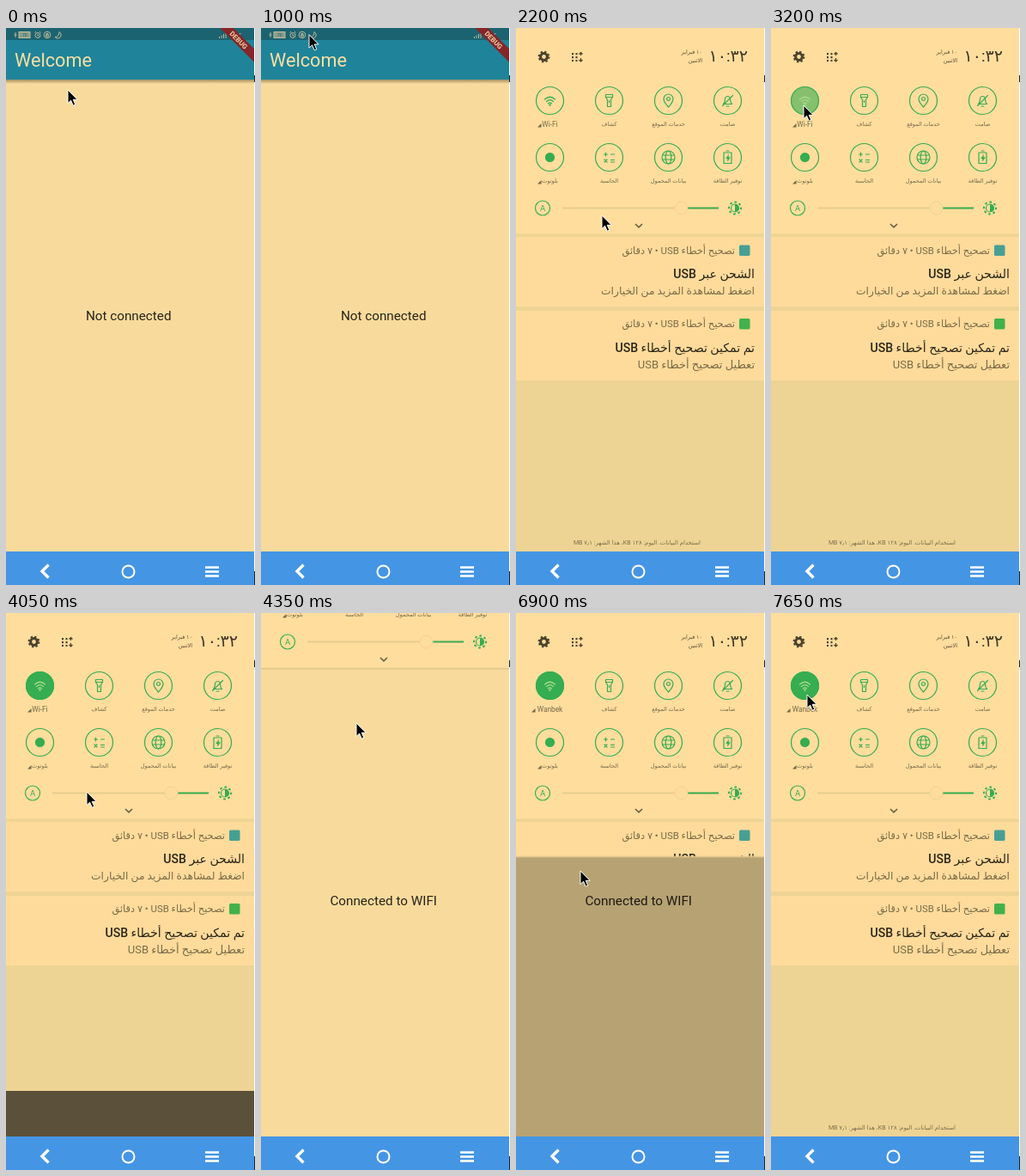
These frames come from a looping animation (290 by 648 pixels, 8000 ms). An HTML page:

```html
<!DOCTYPE html>
<html lang="en">
<head>
<meta charset="utf-8">
<title>Connection status</title>
<style>
  html, body { margin: 0; width: 100%; height: 100%; overflow: hidden; background: #fff; }
  svg { display: block; width: 290px; height: 648px; font-family: Roboto, "DejaVu Sans", sans-serif; }
  .ar { direction: rtl; }
  .mid { text-anchor: middle; }
  .line { fill: none; stroke: #35ad50; stroke-width: 1.2; stroke-linecap: round; stroke-linejoin: round; }
  .green { fill: #35ad50; }
  .label { font-size: 6.6px; fill: #75694a; text-anchor: middle; }
  .latin { font-size: 8.3px; }
  .strong { fill: #2b2519; font-weight: 500; }
  .soft { fill: #7b6b48; }
</style>
</head>
<body>
<svg viewBox="0 0 290 648">
  <defs>
    <linearGradient id="shade" x2="0" y2="1">
      <stop stop-color="#5d5334" stop-opacity=".55"/><stop offset="1" stop-color="#5d5334" stop-opacity="0"/>
    </linearGradient>
    <clipPath id="stage"><rect width="289" height="609"/></clipPath>
    <clipPath id="reveal"><rect id="revealed" width="289"/></clipPath>
  </defs>

  <g clip-path="url(#stage)">
    <rect width="289" height="609" fill="#f8db9c"/>
    <rect y="60" width="289" height="5" fill="url(#shade)"/>
    <rect width="289" height="60" fill="#1f8499"/>
    <rect width="289" height="14" fill="#1b6371"/>
    <text x="10" y="45" font-size="21.7" fill="#f8dfa3">Welcome</text>
    <text id="status" class="mid" x="142.7" y="340.3" font-size="15.25" fill="#27231b"></text>

    <g fill="none" stroke="#bdbb98" stroke-width="1">
      <path d="M11 5v6M9.500 8h3"/>
      <rect x="15" y="4.500" width="13" height="7" fill="#8b9c8c"/>
      <circle cx="37" cy="8.500" r="3"/><path d="M37 7v2h1.500M33.500 5.500l1.500-1.500M40.500 5.500l-1.500-1.500"/>
      <circle cx="48" cy="8" r="3.800"/><path d="M46.700 8h2.600v2h-2.600zM47 8v-1.500h2v1.500"/>
      <path d="M62 4.500a4 4 0 1 1-5 6q5 0 5-6z"/>
      <path d="M248.500 12v-2m2.500 2v-3.500m2.500 3.500v-5m2.500 5v-7"/>
    </g>
    <text x="19" y="10.300" font-size="5" fill="#1b6371">70</text>
    <text x="267" y="10" font-size="6" fill="#bdbb98">XT</text>
    <g id="online" fill="#bdbb98">
      <text x="221" y="12" font-size="5">KB/S</text>
      <path d="M235.500 7q5-4.500 10 0l-5 5z"/>
    </g>
    <g transform="translate(271 14) rotate(45)">
      <rect x="-32" y="-5.500" width="64" height="11" fill="#84262a"/>
      <text class="mid" y="2.900" font-size="8" font-weight="700" fill="#f0d3a6">DEBUG</text>
    </g>

    <rect id="scrim" width="289" height="609"/>

    <g clip-path="url(#reveal)"><g id="panel">
      <rect width="289" height="609" fill="#eed494"/>
      <rect width="289" height="239.500" fill="#ffdd9d"/>
      <path d="M0 243h289v81H0zM0 329h289v81H0z" fill="#fedb9b"/>

      <circle cx="32.500" cy="33.500" r="3.900" fill="none" stroke="#4a412d" stroke-width="3"/>
      <circle cx="32.500" cy="33.500" r="5.900" fill="none" stroke="#4a412d" stroke-width="2" stroke-dasharray="2.300 2.330"/>
      <g fill="none" stroke="#4a412d" stroke-width="2">
        <path d="M66 29v10M70.500 29v10" stroke-dasharray="2.300 1.700"/>
        <path d="M75.500 28v4M75.500 35v4M73.500 30.500l2-2 2 2M73.500 37l2 2 2-2" stroke-width="1.200"/>
      </g>
      <text x="270" y="38.500" font-size="19" text-anchor="end" fill="#3f3727">١٠:٣٢</text>
      <g class="ar" font-size="6.500" fill="#5a4e36">
        <text x="217" y="30">١٠ فبراير</text>
        <text x="217" y="40">الاثنين</text>
      </g>

      <g id="tiles"></g>

      <circle class="line" cx="31" cy="209.500" r="8.500"/>
      <text class="mid green" x="31" y="213" font-size="9.500">A</text>
      <path d="M54 209.500h132" stroke="#e6cd90" stroke-width="2"/>
      <path d="M200 209.500h36" stroke="#35ad50" stroke-width="2"/>
      <circle cx="192.500" cy="209.500" r="7.500" fill="#fedc9d" stroke="#eed497"/>
      <circle class="line" cx="255" cy="209.500" r="7" stroke-dasharray="1 4.498" style="stroke-width:2"/>
      <circle class="line" cx="255" cy="209.500" r="4.500"/>
      <path class="green" d="M255 205a4.500 4.500 0 0 1 0 9z"/>
      <path d="M139 228l4 3.800 4-3.800" fill="none" stroke="#6d6144" stroke-width="1.700"/>

      <rect x="260" y="252.500" width="12.500" height="12.500" rx="1.500" fill="#479f94"/>
      <rect x="260" y="338" width="12.500" height="12.500" rx="1.500" fill="#43b14b"/>
      <g class="ar">
        <text class="soft" x="255" y="262.500" font-size="11.400">تصحيح أخطاء USB • ٧ دقائق</text>
        <text class="strong" x="278" y="291" font-size="14.100">الشحن عبر USB</text>
        <text class="soft" x="278" y="310" font-size="12.300">اضغط لمشاهدة المزيد من الخيارات</text>
        <text class="soft" x="255" y="348" font-size="11.400">تصحيح أخطاء USB • ٧ دقائق</text>
        <text class="strong" x="278" y="377" font-size="14.100">تم تمكين تصحيح أخطاء USB</text>
        <text class="soft" x="278" y="396" font-size="13">تعطيل تصحيح أخطاء USB</text>
        <text class="soft mid" x="141" y="600.500" font-size="7">استخدام البيانات. اليوم: ١٢٨ KB، هذا الشهر: ٧٫١ MB</text>
      </g>
    </g></g>
    <rect id="edge" width="289" height="2" fill="#e3c88c"/>
  </g>

  <rect y="609" width="289" height="39" fill="#4595e5"/>
  <g fill="none" stroke="#fff">
    <path d="M49.500 624.500l-7.500 7.500 7.500 7.500" stroke-width="3.400"/>
    <circle cx="142.500" cy="632.500" r="7" stroke-width="2"/>
    <path d="M232 627.500h16M232 632.500h16M232 637.500h16" stroke-width="2.600"/>
  </g>
  <path d="M289 55h1v8h-1zM289 632h1v16h-1z" fill="#16283a"/>
  <path id="cursor" d="M0 0v15.500l3.600-3.300 2.600 6 2.600-1.100-2.600-5.800h4.900z" fill="#000" stroke="#fff" stroke-width="1"/>
</svg>

<script>
const $ = id => document.getElementById(id);

const wifi = '<path d="M-6-1.500q6-5.500 12 0M-4 1q4-3.600 8 0M-2 3.300q2-1.700 4 0"/><circle cy="5" r=".6"/>';
const tiles = [
  ['Wi-Fi', wifi],
  ['كشاف', '<path d="M-4-7h8v3l-2 3v8h-4v-8l-2-3zM-4-4h8M0 0v2"/>'],
  ['خدمات الموقع', '<path d="M0 7.500q-5.500-6-5.500-9.500a5.500 5.500 0 0 1 11 0q0 3.500-5.500 9.500z"/><circle cy="-2" r="2"/>'],
  ['صامت', '<path d="M-5 4h10q-2-2-2-6a3 3 0 0 0-6 0q0 4-2 6M-1.500 6.500h3M-6 6l12-12"/>'],
  ['بلوتوث', '<circle class="green" r="5"/>'],
  ['الحاسبة', '<path d="M-6-3.500h4M-4-5.500v4M2-3.500h4M-5.500 2.500l3 3M-2.500 2.500l-3 3M2 3h4M2 5.500h4"/>'],
  ['بيانات المحمول', '<circle r="7.500"/><ellipse rx="3.300" ry="7.500"/><path d="M-7-2.500h14M-7 2.500h14"/>'],
  ['توفير الطاقة', '<path d="M-4.500-5.500h9v12.500h-9zM-1.500-7.500h3"/><path class="green" d="M1-3l-3 4.500h2v3l3-4.500h-2z" stroke-width=".4"/>'],
];
$('tiles').innerHTML = tiles.map(([label, icon], i) => {
  const x = 39.5 + 69 * (i % 4), y = i < 4 ? 84.5 : 150.5;
  const mark = i % 4 ? '' : `<path ${i ? '' : 'id="mark"'} d="M-10 31v-4.500l-4.500 4.500z" fill="#75694a"/>`;
  return `<g transform="translate(${x} ${y})">
    <circle class="line" r="16"/>${i ? '' : '<circle id="wifiOn" class="green" r="16.500"/>'}
    <g class="line" ${i ? '' : 'id="wifiIcon"'}>${icon}</g>
    <text class="label ${i ? 'ar' : 'latin'}" ${i ? '' : 'id="network"'} y="${i ? 29.5 : 30.5}">${label}</text>${mark}</g>`;
}).join('');

// Time, pointer x, pointer y
const pointer = [
  [0, 72, 72], [300, 62, 28], [450, 62, 28], [500, 57, 11], [750, 56, 8], [1450, 56, 7],
  [1600, 90, 150], [1700, 111, 283], [1850, 115, 295], [2200, 100, 218], [2700, 38, 90], [3400, 38, 90],
  [3450, 65, 236], [3600, 65, 236], [3650, 80, 408], [3800, 80, 408], [3850, 88, 481], [3950, 88, 481],
  [4050, 94, 208], [4150, 102, 150], [4350, 111, 128], [4800, 152, 345], [5300, 102, 135], [5600, 102, 135],
  [5750, 20, 45], [5900, 20, 45], [5950, 12, 13], [6200, 18, 6], [6350, 18, 6], [6550, 47, 168],
  [6650, 47, 168], [6900, 75, 300], [7100, 78, 280], [7500, 52, 138], [7550, 52, 138], [7650, 42, 95], [8000, 42, 95],
];
// Time, lower edge of the pulled-down shade
const shade = [
  [0, 0], [1450, 0], [1700, 177], [1800, 390], [1900, 530], [2050, 609], [3950, 609], [4000, 595], [4050, 556],
  [4150, 400], [4250, 200], [4350, 65], [4450, 0], [6650, 0], [6850, 177], [6950, 390], [7050, 530], [7200, 609], [8000, 609],
];

function sample(track, t) {
  const i = track.findIndex(key => key[0] > t), a = track[i - 1], b = track[i];
  const k = (t - a[0]) / (b[0] - a[0]);
  return a.slice(1).map((v, j) => v + (b[j + 1] - v) * k);
}

function draw(now) {
  const t = Math.floor(now % 8000 / 50) * 50;
  const [x, y] = sample(pointer, t), [bottom] = sample(shade, t);
  const connected = t >= 4200, named = t >= 5000;
  const on = Math.min(1, Math.max(0, (t - 3050) / 250));

  $('cursor').setAttribute('transform', `translate(${x} ${y})`);
  $('panel').setAttribute('transform', `translate(0 ${Math.min(0, bottom - 241)})`);
  $('revealed').setAttribute('height', bottom);
  $('edge').setAttribute('y', bottom - 1);
  $('edge').style.opacity = bottom > 0 && bottom < 300 ? 0.7 : 0;
  $('scrim').style.opacity = Math.max(0, bottom - 88) * 0.001346;
  $('status').textContent = connected ? 'Connected to WIFI' : 'Not connected';
  $('online').style.opacity = connected ? 1 : 0;
  $('wifiOn').style.opacity = on;
  $('wifiIcon').style.stroke = on > 0.5 ? '#a9d98a' : '';
  $('network').textContent = named ? 'Wanbek' : 'Wi-Fi';
  $('mark').setAttribute('transform', `translate(${named ? -7 : 0} 0)`);
  requestAnimationFrame(draw);
}
requestAnimationFrame(draw);
</script>
</body>
</html>
```
